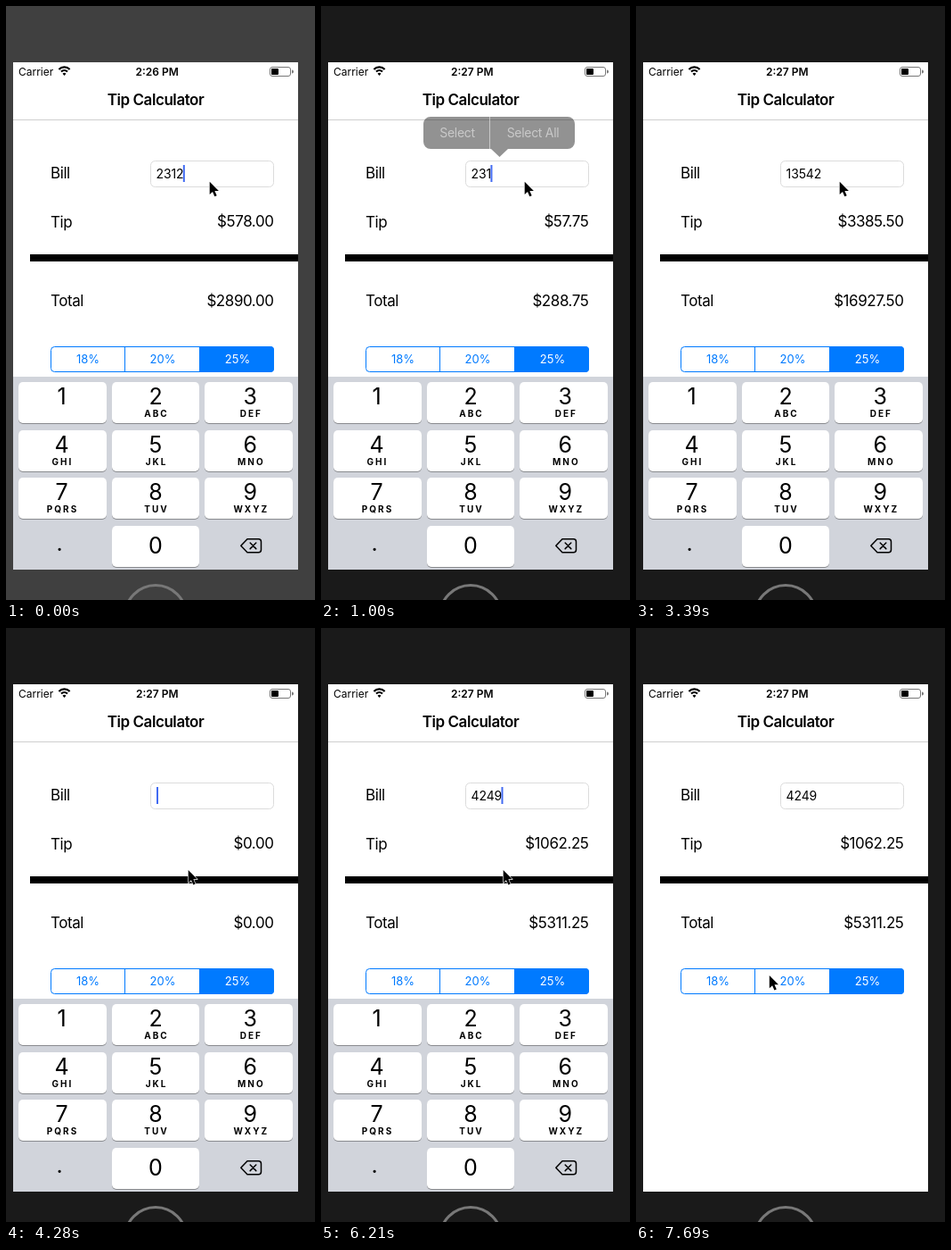
These frames come from a looping animation (347x665 px, 7990 ms). An HTML page:

```html
<!DOCTYPE html>
<html lang="en">
<head>
<meta charset="utf-8">
<title>Tip Calculator</title>
<style>
  html, body { margin: 0; width: 100%; height: 100%; overflow: hidden; background: #1a1a1a; }
  svg { display: block; }
  text { font-family: Inter, "Liberation Sans", sans-serif; white-space: pre; }
  .label { font-size: 17px; letter-spacing: -.43px; }
  .title { font-weight: 600; }
  .end { text-anchor: end; }
  .mid { text-anchor: middle; }
  .status { font-size: 12px; }
  .field { font-size: 14px; letter-spacing: -.15px; }
  .seg { font-size: 13px; fill: #007aff; }
  .menu { font-size: 14px; letter-spacing: -.3px; fill: #fff; }
  .digit { font-size: 25px; }
  .letters { font-size: 10px; font-weight: 700; letter-spacing: 2px; }
</style>
</head>
<body>
<svg id="stage" width="347" height="665" viewBox="0 0 347 665">
  <rect id="bezel" width="347" height="665"/>
  <circle cx="168" cy="683" r="34.5" fill="none" stroke="#787878" stroke-width="3"/>

  <svg x="8" y="63" width="320" height="568" viewBox="8 63 320 568">
    <rect x="8" y="63" width="320" height="568" fill="#fff"/>

    <text class="status" x="14" y="77.5">Carrier</text>
    <g fill="none" stroke="#000" stroke-width="2.2">
      <path d="M62 73.5A5 5 0 0 1 69 73.5M59.4 71A8.6 8.6 0 0 1 71.6 71"/>
      <path d="M65.5 78L63.5 75.8A2.8 2.8 0 0 1 67.5 75.8Z" fill="#000" stroke="none"/>
    </g>
    <text id="clock" class="status title mid" x="169.7" y="77.5"></text>
    <rect x="296.5" y="68.5" width="23" height="10" rx="2.5" fill="none" stroke="#777"/>
    <rect x="298" y="70" width="8" height="7" rx="1"/>
    <path d="M321 71.5a2 2 0 0 1 0 4Z" fill="#777"/>

    <text class="label title mid" x="168" y="111">Tip Calculator</text>
    <rect x="8" y="127" width="320" height="1" fill="#cfcfcf"/>

    <text class="label" x="50" y="193">Bill</text>
    <text class="label" x="50" y="248">Tip</text>
    <text class="label" x="50" y="336">Total</text>
    <rect x="162.5" y="173.5" width="138" height="29" rx="5" fill="#fff" stroke="#dcdcdc"/>
    <text id="bill" class="field" x="168.6" y="193"></text>
    <rect id="caret" y="178" width="2" height="19" fill="#426bf2"/>
    <text id="tip" class="label end" x="300.5" y="247"></text>
    <text id="total" class="label end" x="300.5" y="336"></text>
    <rect x="27" y="278" width="301" height="8"/>

    <rect x="50.5" y="381.5" width="250" height="28" rx="4" fill="none" stroke="#007aff"/>
    <path d="M133.5 381V410" stroke="#007aff"/>
    <path d="M217 381H297a4 4 0 0 1 4 4V406a4 4 0 0 1 -4 4H217Z" fill="#007aff"/>
    <text class="seg mid" x="92" y="400">18%</text>
    <text class="seg mid" x="176" y="400">20%</text>
    <text class="seg mid" x="260" y="400" style="fill:#fff">25%</text>

    <g id="keyboard">
      <rect x="8" y="415" width="320" height="216" fill="#d1d4db"/>
      <g id="keys"></g>
      <text class="digit mid" x="60" y="610">.</text>
      <g fill="none" stroke="#000" stroke-width="1.5" stroke-linejoin="round" stroke-linecap="round">
        <path d="M271 596.8H283.5a3 3 0 0 1 3 3V608.8a3 3 0 0 1 -3 3H271L263.8 604.3Z"/>
        <path d="M274.2 601L280.8 607.6M280.8 601L274.2 607.6"/>
      </g>
    </g>

    <path class="pop" fill="#262626" d="M123 124H277a8 8 0 0 1 8 8V152a8 8 0 0 1 -8 8H210L200.500 169L191 160H123a8 8 0 0 1 -8 -8V132a8 8 0 0 1 8 -8Z"/>
    <path class="pop" d="M189.500 124V160" stroke="#fff"/>
    <text class="menu mid pop" x="153" y="147">Select</text>
    <text class="menu mid pop" x="238" y="147">Select All</text>
  </svg>

  <path id="mouse" d="M0 0V14.200L3.300 11.200L5.600 16.500L8 15.500L5.700 10.300H10.200Z" stroke="#fff" stroke-width="1.2" stroke-linejoin="round" paint-order="stroke"/>
</svg>

<script>
const LOOP = 7990;
const RATE = 0.25;
const $ = id => document.getElementById(id);

// Each track holds [start ms, value...] and keeps its value until the next step.
const tracks = {
  bezel: [[0, '#404040'], [120, '#2d2d2d'], [260, '#1a1a1a']],
  clock: [[0, '2:26 PM'], [850, '2:27 PM']],
  bill: [
    [0, '2312'], [1000, '231'], [1150, '23'], [1300, '2'], [1450, ''],
    [1900, '13'], [2350, '135'], [2500, '1354'], [2650, '13542'],
    [3680, '1354'], [3830, '135'], [3980, '13'], [4130, '1'], [4280, ''],
    [5610, '4'], [5760, '42'], [6060, '424'], [6210, '4249']
  ],
  caret: [
    [0, 1], [3240, .5], [3390, 0], [3680, 1], [4880, .5], [5020, 0],
    [5320, .5], [5470, 1], [6810, .5], [6950, 0]
  ],
  menu: [[0, 0], [560, .5], [710, 1], [1000, .5], [1150, 0]],
  mouse: [
    [0, 228.7, 196.7], [3680, 222, 216], [3830, 210, 252], [3980, 204.7, 271],
    [6660, 193, 294], [6810, 169, 342], [6950, 156, 370], [7100, 152, 379],
    [7690, 149.8, 389]
  ],
  drop: [[0, 0], [7240, 49], [7390, 188], [7540, 216]]
};

function at(name, t) {
  const step = tracks[name].filter(s => s[0] <= t).pop();
  return step.length > 2 ? step.slice(1) : step[1];
}

function buildKeys() {
  const letters = ['', 'ABC', 'DEF', 'GHI', 'JKL', 'MNO', 'PQRS', 'TUV', 'WXYZ'];
  const left = [14, 119, 223], width = [99, 98, 99], center = [62.5, 168, 274.3];
  const key = (col, row, digit, sub) => {
    const y = 421 + Math.round(row * 53.7);
    const box = (dy, fill) =>
      `<rect x="${left[col]}" y="${y + dy}" width="${width[col]}" height="46" rx="5" fill="${fill}"/>`;
    const base = y + (row === 3 ? 31 : 25);
    return box(1, '#898b8f') + box(0, '#fff') +
      `<text class="digit mid" x="${center[col]}" y="${base}">${digit}</text>` +
      `<text class="letters mid" x="${center[col] + 1}" y="${y + 39}">${sub}</text>`;
  };
  $('keys').innerHTML =
    letters.map((sub, i) => key(i % 3, Math.floor(i / 3), i + 1, sub)).join('') + key(1, 3, 0, '');
}

const money = n => '$' + n.toFixed(2);
const pops = document.querySelectorAll('.pop');

function draw(t) {
  const bill = at('bill', t), amount = Number(bill);
  const [mx, my] = at('mouse', t);
  $('bezel').setAttribute('fill', at('bezel', t));
  $('clock').textContent = at('clock', t);
  $('bill').textContent = bill;
  $('tip').textContent = money(amount * RATE);
  $('total').textContent = money(amount * (1 + RATE));
  const end = bill ? $('bill').getComputedTextLength() - 1 : 0;
  $('caret').setAttribute('x', 169 + end);
  $('caret').setAttribute('opacity', at('caret', t));
  pops.forEach(p => p.setAttribute('opacity', at('menu', t)));
  $('keyboard').setAttribute('transform', `translate(0 ${at('drop', t)})`);
  $('mouse').setAttribute('transform', `translate(${mx} ${my})`);
}

buildKeys();
const start = performance.now();
function tick() {
  draw((performance.now() - start) % LOOP);
  requestAnimationFrame(tick);
}
tick();
</script>
</body>
</html>
```
